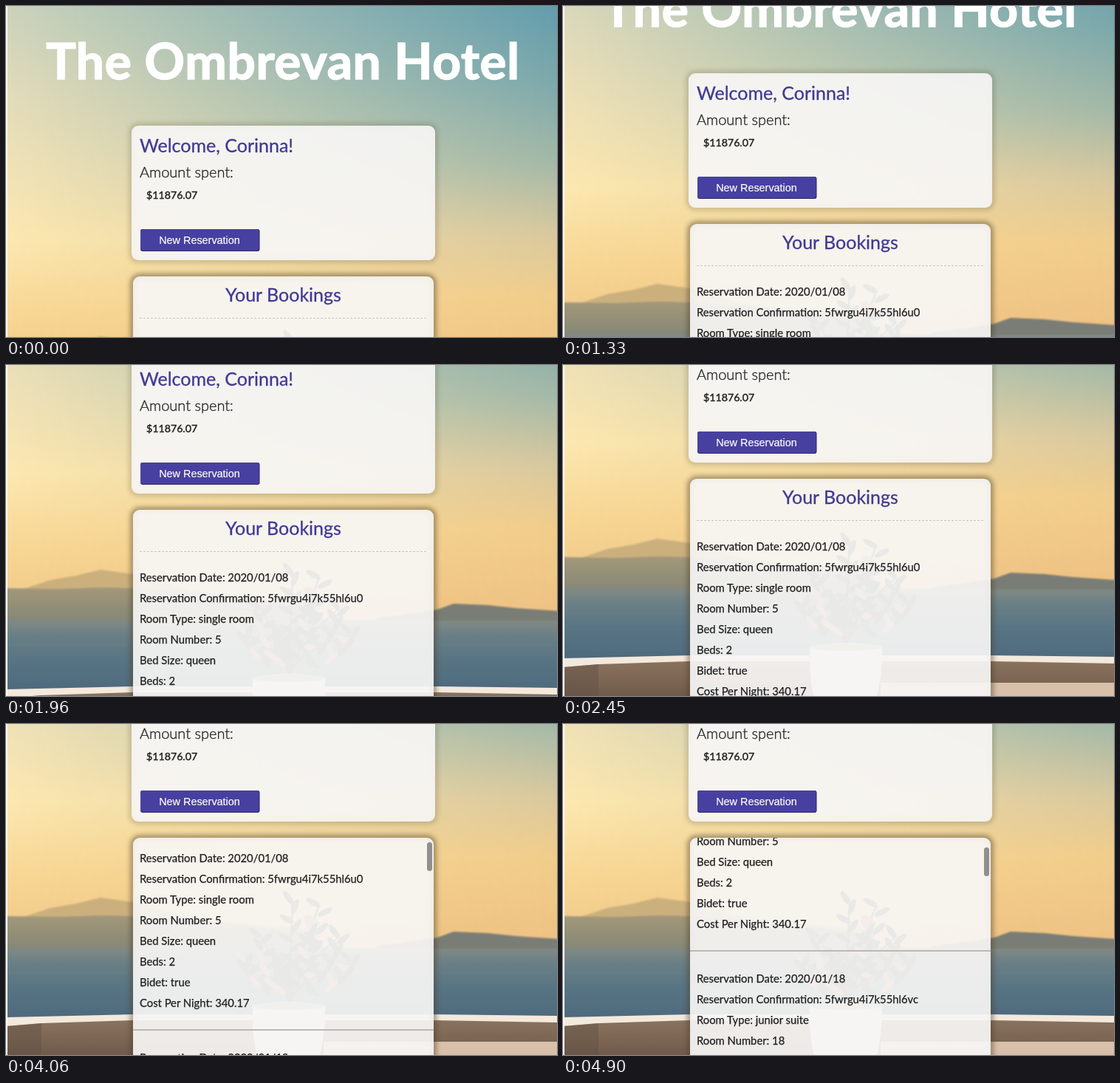
Animation of 746x448 px, one loop 4970 ms. Source, as an HTML page:

```html
<!DOCTYPE html>
<html lang="en">
<head>
<meta charset="utf-8">
<title>Hotel bookings</title>
<style>
  html, body { margin: 0; width: 100%; height: 100%; overflow: hidden; }
  svg { display: block; width: 746px; height: 448px; }
  text { font-family: Lato, "Open Sans", sans-serif; }
  .title { font-size: 67.5px; font-weight: 700; letter-spacing: .7px; fill: #fff; stroke: #fff; stroke-width: 1.6; text-anchor: middle; }
  .head { font-size: 25px; fill: #413a94; stroke: #413a94; stroke-width: .3; }
  .light { font-size: 20px; font-weight: 300; fill: #222; stroke: #222; stroke-width: .35; }
  .sum { font-size: 14.2px; fill: #222; stroke: #222; stroke-width: .45; }
  .row { font-size: 14.8px; fill: #1f1f1f; stroke: #1f1f1f; stroke-width: .25; }
  .btn { font: 14.4px "Liberation Sans", Arial, sans-serif; fill: #fff; stroke: #fff; stroke-width: .2; text-anchor: middle; }
  .card { fill: #f8f7f6; fill-opacity: .92; }
  .shade { fill: none; stroke: #4a3c28; filter: url(#blur); }
</style>
</head>
<body>
<svg viewBox="0 0 746 448">
  <defs>
    <linearGradient id="west" x2="0" y2="1">
      <stop offset="0" stop-color="#cbd3bb"/>
      <stop offset=".2" stop-color="#e0dbba"/>
      <stop offset=".4" stop-color="#f0e2b7"/>
      <stop offset=".6" stop-color="#fce8b0"/>
      <stop offset=".8" stop-color="#f7d693"/>
      <stop offset="1" stop-color="#eec688"/>
    </linearGradient>
    <linearGradient id="east" x2="0" y2="1">
      <stop offset="0" stop-color="#629cac"/>
      <stop offset=".19" stop-color="#7ba8ab"/>
      <stop offset=".4" stop-color="#a3b8a7"/>
      <stop offset=".58" stop-color="#d8c89e"/>
      <stop offset=".74" stop-color="#f1cd8b"/>
      <stop offset="1" stop-color="#edbf82"/>
    </linearGradient>
    <linearGradient id="fade">
      <stop offset="0" stop-color="#000"/>
      <stop offset=".5" stop-color="#858585"/>
      <stop offset="1" stop-color="#fff"/>
    </linearGradient>
    <linearGradient id="sea" x2="0" y2="1">
      <stop offset="0" stop-color="#838b84"/>
      <stop offset=".2" stop-color="#6a7f86"/>
      <stop offset=".5" stop-color="#587483"/>
      <stop offset="1" stop-color="#4b677c"/>
    </linearGradient>
    <linearGradient id="hill" x2="0" y2="1">
      <stop offset="0" stop-color="#a3987a"/>
      <stop offset="1" stop-color="#838675"/>
    </linearGradient>
    <linearGradient id="wall" x2="0" y2="1">
      <stop offset="0" stop-color="#8a725d"/>
      <stop offset="1" stop-color="#6a5648"/>
    </linearGradient>
    <mask id="across"><rect width="746" height="530" fill="url(#fade)"/></mask>
    <filter id="blur" x="-10%" y="-10%" width="120%" height="120%"><feGaussianBlur stdDeviation="3.5"/></filter>
    <filter id="soft"><feGaussianBlur stdDeviation="1"/></filter>
    <clipPath id="panel"><rect x="172" y="366" width="407" height="420" rx="9"/></clipPath>
  </defs>

  <g id="page">
    <rect width="746" height="530" fill="url(#west)"/>
    <rect width="746" height="530" fill="url(#east)" mask="url(#across)"/>
    <g filter="url(#soft)">
      <path d="M15 476L60 461 95 455 128 447 150 450 172 453 250 476 420 490V515H15Z" fill="#cbb07e"/>
      <path d="M-5 472L70 473 130 471 172 472 300 482 420 497V520H-5Z" fill="url(#hill)"/>
      <path d="M500 513L560 505 584 501 606 493 652 495 690 499 750 503V520H500Z" fill="#7a7d75"/>
      <path d="M-5 514H380L580 516H750V625H-5Z" fill="url(#sea)"/>
    </g>
    <path d="M0 609L172 605H580L746 607V670H0Z" fill="#f3e9dc"/>
    <path d="M0 621L48 617 172 613H580L746 616V670H0Z" fill="url(#wall)"/>
    <path d="M0 621L48 617V670H0Z" fill="#5f4e42" opacity=".4"/>
    <path d="M430 642H746V670H430Z" fill="#d9c0aa"/>
    <g id="plant"></g>

    <text class="title" x="375" y="99">The Ombrevan Hotel</text>

    <rect class="shade" x="170" y="162" width="411" height="182" rx="9" stroke-width="5" opacity=".32"/>
    <rect class="card" x="170" y="162" width="411" height="182" rx="9"/>
    <text class="head" x="181" y="198">Welcome, Corinna!</text>
    <text class="light" x="181" y="232">Amount spent:</text>
    <text class="sum" x="190" y="261">$11876.07</text>
    <rect x="182" y="302" width="161.5" height="30" rx="3" fill="#2b2768"/>
    <rect x="182" y="302" width="160.5" height="29" rx="3" fill="#4840a0"/>
    <text class="btn" x="262" y="322">New Reservation</text>

    <rect class="shade" x="172" y="366" width="407" height="420" rx="9" stroke-width="6" opacity=".62"/>
    <rect class="card" x="172" y="366" width="407" height="420" rx="9"/>
    <g clip-path="url(#panel)">
      <g id="list">
        <text class="head" x="375.5" y="400" text-anchor="middle">Your Bookings</text>
        <path d="M181 422.5H570" stroke="#cbc6c0" stroke-dasharray="3 2"/>
        <path d="M172 690H579" stroke="#bfb7b5" stroke-width="2"/>
      </g>
      <rect id="thumb" x="570" y="368" width="7" height="39" rx="3.5" fill="#908f8e"/>
    </g>
  </g>
  <rect width="2" height="448" fill="#fbf9f2"/>
</svg>
<script>
const LOOP = 4970, STEP = 70;
const $ = id => document.getElementById(id);

function add(parent, tag, attrs, content) {
  const el = document.createElementNS("http://www.w3.org/2000/svg", tag);
  for (const k in attrs) el.setAttribute(k, attrs[k]);
  if (content) el.textContent = content;
  parent.appendChild(el);
}

const addRows = (top, rows) => rows.forEach((row, i) =>
  add($("list"), "text", { class: "row", x: 181, y: top + 28 * i }, row));

addRows(463, [
  "Reservation Date: 2020/01/08",
  "Reservation Confirmation: 5fwrgu4i7k55hl6u0",
  "Room Type: single room",
  "Room Number: 5",
  "Bed Size: queen",
  "Beds: 2",
  "Bidet: true",
  "Cost Per Night: 340.17"
]);
addRows(733, [
  "Reservation Date: 2020/01/18",
  "Reservation Confirmation: 5fwrgu4i7k55hl6vc",
  "Room Type: junior suite",
  "Room Number: 18"
]);

// Potted plant behind the bookings card
function drawPlant() {
  const g = $("plant");
  let seed = 11;
  const rnd = () => (seed = seed * 16807 % 2147483647) / 2147483647;
  const tips = [[325, 535], [345, 500], [388, 455], [424, 458], [412, 490], [450, 500], [468, 535], [370, 530]];
  for (const [x, y] of tips) {
    add(g, "path", { d: `M383 600Q383 560 ${x} ${y}`, stroke: "#4f4a38", "stroke-width": 2, fill: "none" });
    for (let i = 0; i < 9; i++) {
      const k = i / 11, side = i % 2 ? 1 : -1;
      const px = x + (383 - x) * k * k, py = y + (595 - y) * k;
      add(g, "ellipse", {
        rx: 4, ry: 11, cx: 0, cy: -9, fill: rnd() < .15 ? "#c08f78" : "#45483a",
        transform: `translate(${px} ${py}) rotate(${side * (20 + rnd() * 50)})`
      });
    }
  }
  add(g, "path", { d: "M334 594Q383 582 432 594V612Q428 670 412 690H352Q334 660 334 612Z", fill: "#e6e0d8" });
  add(g, "ellipse", { cx: 383, cy: 594, rx: 49, ry: 5, fill: "#b9a892" });
}
drawPlant();

// Monotone cubic curve through [time, value] points
function curve(pts) {
  const slope = i => (pts[i + 1][1] - pts[i][1]) / (pts[i + 1][0] - pts[i][0]);
  const tangent = pts.map((_, i) => {
    if (!i || i === pts.length - 1) return 0;
    const a = slope(i - 1), b = slope(i);
    return a * b > 0 ? 2 * a * b / (a + b) : 0;
  });
  return t => {
    if (t <= pts[0][0]) return pts[0][1];
    const n = pts.findIndex(p => p[0] >= t);
    if (n < 0) return pts[pts.length - 1][1];
    const [t0, v0] = pts[n - 1], [t1, v1] = pts[n];
    const h = t1 - t0, u = (t - t0) / h, w = 1 - u;
    return v0 * (1 + 2 * u) * w * w + tangent[n - 1] * h * u * w * w
         + v1 * u * u * (3 - 2 * u) - tangent[n] * h * u * u * w;
  };
}

const pageScroll = curve([[910, 0], [1050, 23], [1330, 71], [1960, 170], [2450, 212]]);
const listScroll = curve([[3500, 0], [4060, 64], [4340, 92], [4410, 92], [4900, 171]]);

function render(ms) {
  const t = Math.floor(ms % LOOP / STEP) * STEP;
  const inner = Math.round(listScroll(t));
  $("page").setAttribute("transform", `translate(0 ${-Math.round(pageScroll(t))})`);
  $("list").setAttribute("transform", `translate(0 ${-inner})`);
  $("thumb").setAttribute("y", 368 + Math.round(inner * .065));
  $("thumb").setAttribute("visibility", inner ? "visible" : "hidden");
}

const start = performance.now();
function tick() {
  render(performance.now() - start);
  requestAnimationFrame(tick);
}
tick();
</script>
</body>
</html>
```
